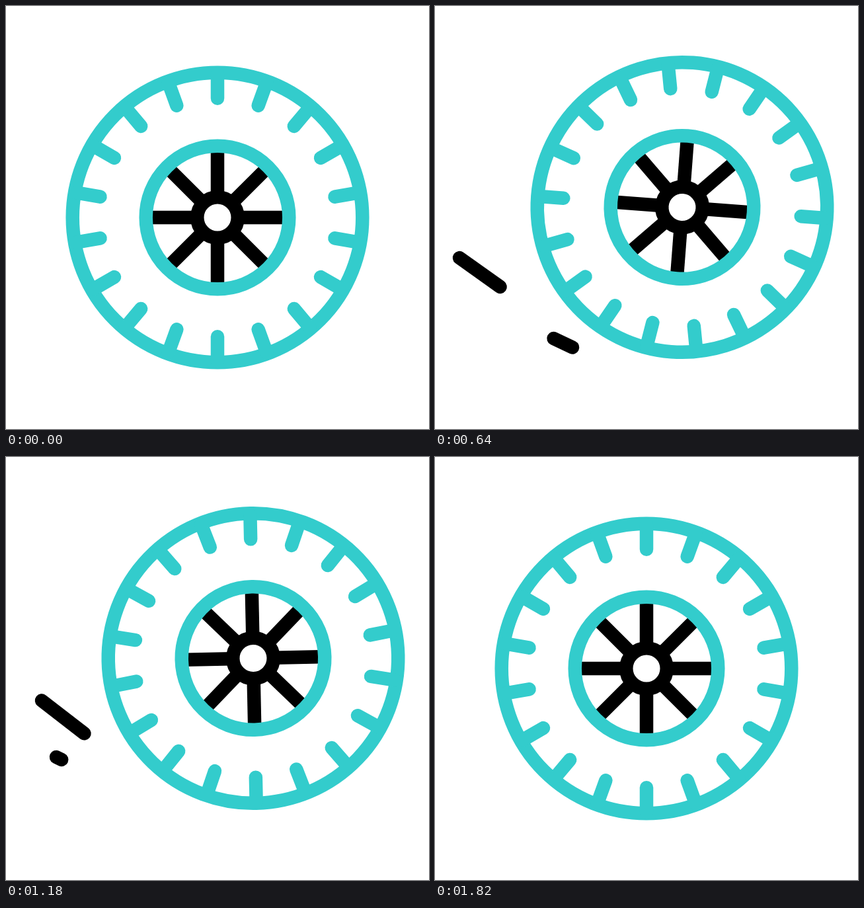
Animation of 640x640 px, one loop 2.04 s. Source, as an HTML page with a canvas:

```html
<!DOCTYPE html>
<html lang="en">
<head>
<meta charset="utf-8">
<title>Rolling wheel</title>
<style>
html, body { margin: 0; width: 100%; height: 100%; overflow: hidden; background: #fff; }
canvas { display: block; width: 100vmin; height: 100vmin; }
</style>
</head>
<body>
<canvas id="stage" width="640" height="640"></canvas>
<script>
const ctx = document.getElementById('stage').getContext('2d');
const LOOP = 2040, STEP = 20, LINE = 20.5;
const TEAL = '#33cccc', BLACK = '#000';

// Speed lines: start and end point, then time spans of the head and the tail
const streaks = [
  { from: [171, 476.5], to: [37, 381], head: [236, 636], tail: [395, 860] },
  { from: [208, 516.5], to: [76, 454], head: [520, 920], tail: [790, 1250] },
  { from: [192, 475], to: [54, 368.5], head: [712, 1112], tail: [940, 1400] }
];

function ease(t, a, b) {
  const u = Math.min(1, Math.max(0, (t - a) / (b - a)));
  return u * u * (3 - 2 * u);
}

function line(x1, y1, x2, y2) {
  ctx.beginPath();
  ctx.moveTo(x1, y1);
  ctx.lineTo(x2, y2);
  ctx.stroke();
}

function ring(r) {
  ctx.beginPath();
  ctx.arc(0, 0, r, 0, Math.PI * 2);
  ctx.stroke();
}

function rays(count, r1, r2) {
  for (let i = 0; i < count; i++) {
    const a = i / count * Math.PI * 2;
    const x = Math.sin(a), y = -Math.cos(a);
    line(x * r1, y * r1, x * r2, y * r2);
  }
}

function drawStreak(s, t) {
  const h = ease(t, ...s.head), k = ease(t, ...s.tail);
  if (h - k < 0.001) return;
  const [x, y] = s.from, dx = s.to[0] - x, dy = s.to[1] - y;
  line(x + dx * k, y + dy * k, x + dx * h, y + dy * h);
}

function drawWheel(t) {
  const shift = ease(t, 0, 480) - ease(t, 1240, 1820);
  ctx.save();
  ctx.translate(320 + 54 * shift, 320 - 15.5 * shift);
  ctx.rotate(Math.PI * ease(t, 0, 1240));
  ctx.strokeStyle = BLACK;
  ctx.lineCap = 'butt';
  rays(8, 32, 102);
  ring(30.75);
  ctx.strokeStyle = TEAL;
  ring(108.3);
  ring(219.3);
  ctx.lineCap = 'round';
  rays(18, 180.2, 217);
  ctx.restore();
}

function draw(t) {
  ctx.fillStyle = '#fff';
  ctx.fillRect(0, 0, 640, 640);
  ctx.lineWidth = LINE;
  ctx.lineCap = 'round';
  ctx.strokeStyle = BLACK;
  for (const s of streaks) drawStreak(s, t);
  drawWheel(t);
}

const begin = performance.now();
function tick(now) {
  const t = Math.max(0, now - begin) % LOOP;
  draw(Math.floor(t / STEP) * STEP);
  requestAnimationFrame(tick);
}
draw(0);
requestAnimationFrame(tick);
</script>
</body>
</html>
```
